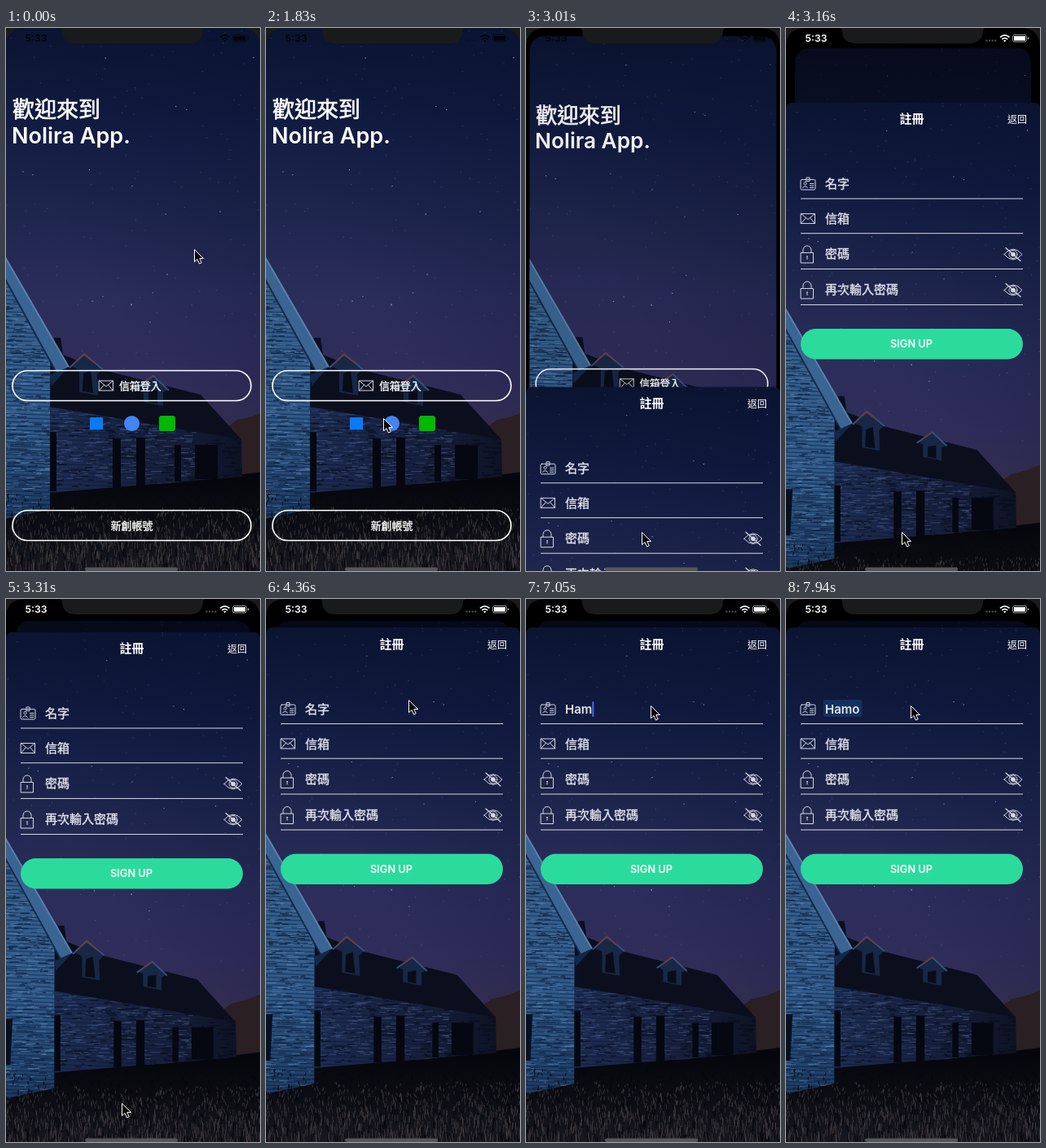
These frames come from a looping animation (312 by 668 pixels, 8000 ms). An HTML page:

```html
<!DOCTYPE html>
<html lang="zh-Hant">
<head>
<meta charset="utf-8">
<title>Sign up</title>
<style>
html, body { margin: 0; width: 100%; height: 100%; overflow: hidden; background: #000; }
svg { display: block; }
#stage { width: 100vw; height: 100vh; }
text { font: 500 15px Inter, "Noto Sans CJK TC", "Noto Sans CJK", sans-serif; fill: #fff; }
.cjk { stroke: #fff; stroke-width: .35; }
.mid { text-anchor: middle; }
.heading { font-size: 27px; }
.heading.cjk { stroke-width: .7; }
.latin { font-weight: 600; }
.small { font-size: 12.9px; }
.field { fill: #e4e5ea; }
.field.cjk { stroke: #e4e5ea; }
.icon { fill: none; stroke: #d5d7df; stroke-width: 1; stroke-linecap: round; stroke-linejoin: round; }
.pill { fill: none; stroke: #fff; stroke-width: 1.6; }
.wear { fill: none; }
</style>
</head>
<body>
<svg id="stage" viewBox="0 0 312 668">
  <defs>
    <linearGradient id="sky" x2="0" y2="1">
      <stop stop-color="#0b1430"/>
      <stop offset=".18" stop-color="#121c42"/>
      <stop offset=".36" stop-color="#20274f"/>
      <stop offset=".5" stop-color="#2b2d5a"/>
      <stop offset=".64" stop-color="#302d5a"/>
      <stop offset=".76" stop-color="#352e50"/>
    </linearGradient>
    <linearGradient id="shade" y1="1" y2="0">
      <stop offset=".4" stop-color="#0a1234" stop-opacity="0"/>
      <stop offset="1" stop-color="#0a1234" stop-opacity=".45"/>
    </linearGradient>
    <linearGradient id="gable" x2="0" y2="1">
      <stop stop-color="#37628f"/>
      <stop offset=".6" stop-color="#305b8c"/>
      <stop offset="1" stop-color="#1b3a62"/>
    </linearGradient>
    <linearGradient id="barn">
      <stop stop-color="#1d2d54"/>
      <stop offset=".7" stop-color="#161d38"/>
      <stop offset="1" stop-color="#0e1222"/>
    </linearGradient>
    <linearGradient id="ground" x2="0" y2="1">
      <stop stop-color="#04060c"/>
      <stop offset=".4" stop-color="#090b11"/>
      <stop offset="1" stop-color="#171720"/>
    </linearGradient>
    <pattern id="boards" width="40" height="5" patternUnits="userSpaceOnUse" patternTransform="skewY(2)">
      <path d="M0 4.2H40" stroke="#0a1630" stroke-width="1.4" opacity=".5"/>
    </pattern>
    <clipPath id="gableClip"><path d="M-12 275 54 392V592L-12 606Z"/></clipPath>
    <clipPath id="barnClip"><path d="M54 464 289 505 290 552 50 572Z"/></clipPath>
    <clipPath id="screenClip"><path d="M0 668V22Q0 0 22 0H290Q312 0 312 22V668Z"/></clipPath>
    <clipPath id="sheetClip"><path d="M0 668V44Q0 35 9 35H303Q312 35 312 44V668Z"/></clipPath>

    <g id="photo">
      <path d="M-12 0H324V668H-12Z" fill="url(#sky)"/>
      <path d="M-12 0H324V560H-12Z" fill="url(#shade)"/>
      <g id="stars" fill="none" stroke="#a9b6e4" stroke-linecap="round"></g>
      <path d="M270 492 284 482 302 478 324 469V560H270Z" fill="#2a1f22"/>
      <path d="M-12 600 50 568 200 560 324 545V668H-12Z" fill="url(#ground)"/>
      <path d="M54 460 289 505 290 552 50 572Z" fill="url(#barn)"/>
      <g clip-path="url(#barnClip)">
        <path d="M40 450H300V580H40Z" fill="url(#boards)"/>
        <path id="barnDark" class="wear" stroke="#080c1a" stroke-width="2" opacity=".6"/>
        <path id="barnLight" class="wear" stroke="#45598a" opacity=".6"/>
      </g>
      <path d="M47 497H62V570H47ZM131 505h10v60h-10ZM160 504h11v59h-11ZM207 513h8v45h-8ZM232 513h28v42h-28Z" fill="#050811"/>
      <path d="M55 396 59 381H67L70 402 116 420 239 451 289 506 54 466Z" fill="#0b0f1d"/>
      <path d="M80 416 96 402 118 420 112 426 113 452 90 448V421ZM163 441 181 429 199 445 193 448V465L169 460V444Z" fill="#172746"/>
      <path d="M95 425 104 421 107 449 94 447ZM175 447 186 445V462L175 460Z" fill="#080c18"/>
      <path d="M78 418 96 401 119 420M161 442 181 428 200 446" fill="none" stroke="#36507d" stroke-width="2"/>
      <path d="M84 412 96 402 109 412M168 437 181 428" fill="none" stroke="#6f3b2f" stroke-width="1.6"/>
      <path d="M-12 275 54 392V592L-12 606Z" fill="url(#gable)"/>
      <g clip-path="url(#gableClip)">
        <path d="M-12 270H60V610H-12Z" fill="url(#boards)"/>
        <path id="gableDark" class="wear" stroke="#0d1c38" stroke-width="1.8" opacity=".6"/>
        <path id="gableLight" class="wear" stroke="#6391bf" opacity=".55"/>
      </g>
      <path d="M-12 502H0L-3 562H-12Z" fill="#07101f"/>
      <path d="M-12 263 77 417 62 424-12 288Z" fill="#3a6593"/>
      <path d="M-12 263 77 417" stroke="#5a81aa" stroke-width="2"/>
      <path d="M-12 289 62 424" stroke="#14294a" stroke-width="2"/>
      <path d="M54 427 77 417 56 440Z" fill="#12284a"/>
      <path id="grassDark" class="wear" stroke="#05070c"/>
      <path id="grassLight" class="wear" stroke="#504849" stroke-width=".9" opacity=".65"/>
    </g>

    <path id="mail" d="M-8.5-6H8.5V6H-8.5ZM-8.5-6 0 1 8.5-6M-8.5 6-2.5-1M8.5 6 2.5-1"/>
    <path id="card" d="M-7.5-5H7.5Q9-5 9-3.5V6Q9 7.5 7.5 7.5H-7.5Q-9 7.5-9 6V-3.5Q-9-5-7.5-5ZM-2-5V-7.5H2V-3H-2ZM2.500 0H7M2.500 2.500H7M2.500 5H7M-6.500 5Q-3.500 1.500-.5 5M-3.500-2a1.700 1.700 0 1 0 .1 0"/>
    <path id="lock" d="M-7.500-2H7.500V10.500H-7.500ZM-5-2V-5.500A5 5 0 0 1 5-5.500V-2M0 3V6M-.5 2.500h1"/>
    <g id="eye">
      <path d="M-11 0Q0-13 11 0Q0 13-11 0Z"/>
      <circle r="5"/><circle r="2.500" fill="#d5d7df"/>
      <path d="M-9-8 9 8" stroke-width="1.300"/>
    </g>
  </defs>

  <path d="M0 0H312V668H0Z"/>
  <g id="home" clip-path="url(#screenClip)">
    <use href="#photo"/>
    <text class="heading cjk" x="8" y="110">歡迎來到</text>
    <text class="heading latin" x="7" y="142">Nolira App.</text>
    <rect class="pill" x="8" y="421.500" width="293" height="37" rx="18.500"/>
    <use href="#mail" class="icon" x="123" y="440"/>
    <text class="small cjk" x="139" y="444.500">信箱登入</text>
    <rect x="103" y="479" width="16" height="15" fill="#087bf8"/>
    <circle cx="154.500" cy="486.500" r="9.500" fill="#4285f4"/>
    <rect x="188" y="477" width="20" height="19" rx="3" fill="#00b900"/>
    <rect class="pill" x="8" y="593.500" width="293" height="37" rx="18.500"/>
    <text id="create" class="small cjk mid" x="154.500" y="616.500">新創帳號</text>
    <path id="dim" d="M0 0H312V668H0Z"/>
  </g>

  <g id="sheet">
    <g clip-path="url(#sheetClip)">
      <use href="#photo" transform="translate(8.100 35) scale(.948)"/>
      <text class="mid latin" x="154.500" y="61">註冊</text>
      <text x="272" y="60.500" style="font-size:12px">返回</text>
      <g class="icon">
        <use href="#card" x="27" y="135"/>
        <use href="#mail" x="27" y="178"/>
        <use href="#lock" x="26" y="222"/>
        <use href="#lock" x="26" y="266"/>
        <use href="#eye" x="279" y="222"/>
        <use href="#eye" x="279" y="266"/>
        <path d="M18 153.500H291M18 196.200H291M18 240H291M18 284H291" stroke-linecap="butt"/>
      </g>
      <rect id="mark" x="46" y="124" width="47.500" height="21" rx="2" fill="#12315f"/>
      <text id="name" x="48" y="140.500"></text>
      <text class="field cjk" x="48" y="183.500">信箱</text>
      <text class="field cjk" x="48" y="227">密碼</text>
      <text class="field cjk" x="48" y="270.500">再次輸入密碼</text>
      <rect id="caret" y="126" width="2" height="19" rx="1" fill="#3f6cf0"/>
      <rect x="18" y="313.500" width="273" height="37.500" rx="18.700" fill="#2bdb9c"/>
      <text class="mid latin" x="154" y="336.500" style="font-size:12.800px">SIGN UP</text>
    </g>
  </g>

  <path d="M0 0H24Q0 0 0 24ZM312 0H288Q312 0 312 24ZM66 0Q69 1 69 4Q70 19 86 19H225Q241 19 242 4Q242 1 245 0Z" fill="#191a1b"/>
  <g id="status">
    <text class="latin" x="23.500" y="17.300" style="font-size:12.300px;fill:currentColor">5:33</text>
    <path d="M245.500 15.500h13" stroke="currentColor" stroke-width="2" stroke-dasharray="2 1.600" opacity=".35"/>
    <g fill="none" stroke="currentColor" stroke-width="1.700">
      <path d="M263 11.300Q268.700 6.500 274.500 11.300M265.300 13.800Q268.700 11 272.200 13.800"/>
      <rect x="278.500" y="8.500" width="17" height="8.500" rx="2.500" stroke-width="1" opacity=".6"/>
    </g>
    <path d="M267 15.300Q268.700 14 270.500 15.300L268.700 17.200ZM280 10H294V15.500H280ZM297 11Q299 12.700 297 14.500Z" fill="currentColor"/>
  </g>
  <rect x="97" y="663.500" width="114" height="4.500" rx="2.200" fill="#55565a"/>
  <path id="cursor" d="M0 0V15.200L3.500 12 6 17.500 8.700 16.300 6.300 11H11Z" stroke="#fff" stroke-linejoin="round"/>
</svg>
<script>
const el = id => document.getElementById(id);

let seed = 11;
const rand = (min = 0, max = 1) => {
  seed = (seed * 16807) % 2147483647;
  return min + (max - min) * seed / 2147483647;
};
const strokes = (count, make) => Array.from({ length: count }, make).join('');
const draw = (id, count, make) => el(id).setAttribute('d', strokes(count, make));

// Photo texture: stars, worn boards and grass
const star = () => `M${rand(-10, 322).toFixed(1)} ${(rand() ** 1.2 * 440).toFixed(1)}h.1`;
el('stars').innerHTML =
  `<path d="${strokes(150, star)}" stroke-width=".8" opacity=".4"/>` +
  `<path d="${strokes(12, star)}M154 340v1M177 362h.1M106 336h.1M263 226h.1M122 37h.1" stroke-width="1.3" opacity=".8"/>`;

const wear = (left, right, top, bottom) => () =>
  `M${rand(left, right).toFixed(1)} ${rand(top, bottom).toFixed(1)}h${rand(2, 14).toFixed(1)}`;
draw('gableDark', 260, wear(-16, 54, 290, 600));
draw('gableLight', 260, wear(-16, 54, 290, 600));
draw('barnDark', 200, wear(50, 285, 470, 565));
draw('barnLight', 260, wear(50, 230, 470, 555));

const grass = top => () => {
  const depth = rand();
  return `M${rand(-12, 324).toFixed(1)} ${(top + depth * (672 - top)).toFixed(1)}` +
    `l${rand(-2, 2).toFixed(1)} ${(-3 - depth * 8).toFixed(1)}`;
};
draw('grassDark', 450, grass(575));
draw('grassLight', 750, grass(592));

// Each step: start time, then its value
const cursorSteps = [
  [0, 231, 272], [500, 227, 272], [650, 221, 272], [790, 218, 272],
  [1090, 213, 290], [1240, 198, 345], [1390, 172, 425], [1540, 146, 488],
  [1680, 138, 497], [1830, 144, 480], [1980, 158, 481], [2120, 164, 482],
  [2270, 158, 520], [2420, 141, 595], [2560, 142, 620],
  [3460, 158, 420], [3610, 185, 167],
  [3910, 182, 150], [4060, 178, 132], [4210, 175, 121], [4360, 175, 124],
  [5410, 161, 128], [5560, 153, 131]
];
const nameSteps = [[0, '名字'], [6310, 'H'], [6600, 'Ha'], [7050, 'Ham'], [7200, 'Hamo']];
const stepAt = (steps, t) => steps.findLast(([start]) => start <= t);
const show = (id, on) => el(id).setAttribute('visibility', on ? 'visible' : 'hidden');

// Critically damped slide, refreshed every 150 ms
function sheetOffset(t) {
  const tick = 2860 + Math.floor((t - 2860) / 150) * 150;
  if (tick >= 3610) return 0;
  const x = Math.max(0, tick - 2942) * 0.0185;
  return 633 * (1 + x) * Math.exp(-x);
}

function render(t) {
  const [, x, y] = stepAt(cursorSteps, t);
  el('cursor').setAttribute('transform', `translate(${x + .5} ${y + .5})`);

  const offset = sheetOffset(t);
  const open = 1 - offset / 633;
  const scale = 1 - .077 * open;
  el('sheet').setAttribute('transform', `translate(0 ${offset})`);
  el('home').setAttribute('transform', `translate(${156 * (1 - scale)} ${27 * open}) scale(${scale})`);
  el('dim').setAttribute('opacity', .5 * open ** 2);
  el('create').setAttribute('opacity', t >= 2860 ? .4 : 1);
  el('status').style.color = t >= 3160 ? '#fff' : '#03050a';

  const [start, name] = stepAt(nameSteps, t);
  const label = el('name');
  label.textContent = name;
  label.setAttribute('class', start ? 'field latin' : 'field cjk');
  el('caret').setAttribute('x', start ? 48 + label.getComputedTextLength() : 47.5);
  show('caret', t >= 5860 && t < 7940);
  show('mark', t >= 7340);
}

const begin = performance.now();
function frame() {
  render((performance.now() - begin) % 8000);
  requestAnimationFrame(frame);
}
frame();
</script>
</body>
</html>
```
